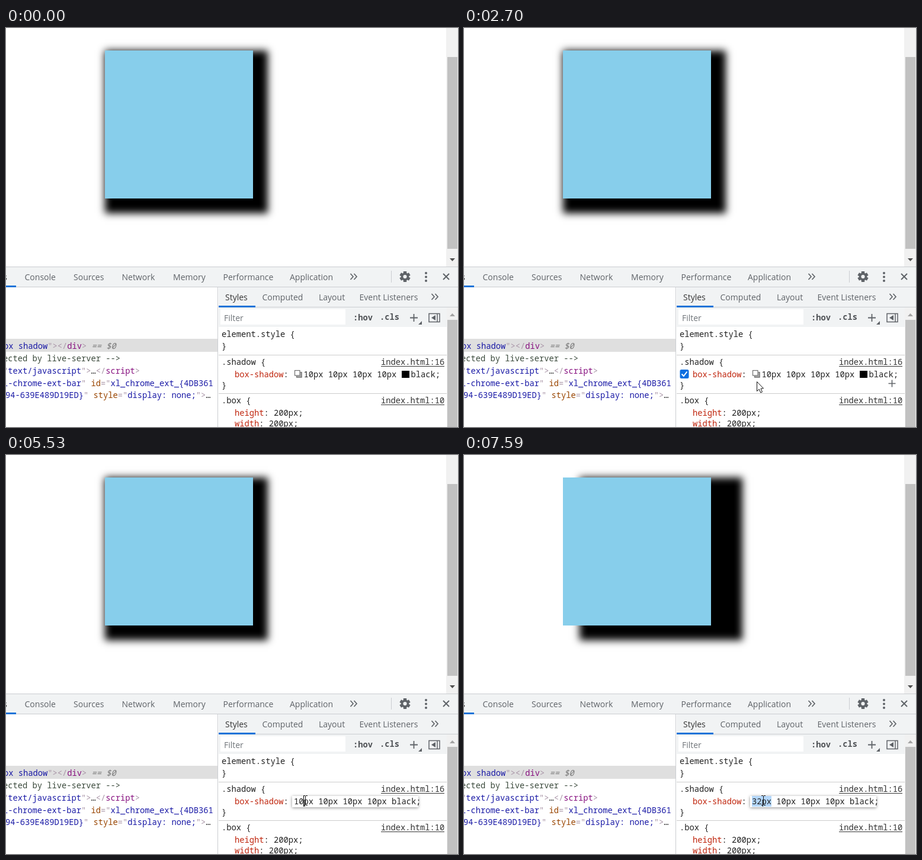
Animation of 763x674 px, one loop 8 s. Source, as an HTML page with a canvas:

```html
<!DOCTYPE html>
<html lang="en">
<head>
<meta charset="utf-8">
<title>Box shadow in the styles pane</title>
<style>
  html, body { margin: 0; width: 100%; height: 100%; overflow: hidden; background: #fff; }
  #box { position: absolute; left: 167px; top: 38px; width: 250px; height: 250px; background: skyblue; }
  canvas { position: absolute; left: 0; top: 0; }
</style>
</head>
<body>
<div id="box"></div>
<canvas id="stage" width="763" height="674"></canvas>
<script>
const box = document.getElementById('box');
const ctx = document.getElementById('stage').getContext('2d');
const LOOP = 8000;
const ZOOM = 1.25;
const UI = '14px "Open Sans", "Noto Sans", sans-serif';
const MONO = '13.75px "Noto Sans Mono", "DejaVu Sans Mono", monospace';
const INK = '#222', GREY = '#5f6368', BAR = '#f1f3f4', LINE = '#cacdd1', BLUE = '#1a73d8';
const TAG = '#881280', PUNCT = '#a894a6', ATTR = '#994500', VALUE = '#1a1aa6', PROP = '#c0260e';

// Pointer waypoints: time, x, y
const PATH = [
  [745, 508, 592], [940, 462, 500], [1200, 362, 300], [1450, 322, 223],
  [1980, 322, 223], [2175, 370, 337], [2435, 446, 520], [2630, 490, 607], [2760, 498, 587],
  [2824, 498, 587], [2825, 648, 606], [3084, 648, 606], [3085, 622, 603], [3280, 523, 583],
  [4254, 523, 583], [4255, 517, 583], [4385, 505, 583]
];
// Click highlights: start, end, x, y
const CLICKS = [[1580, 1710, 322, 223], [3550, 3610, 523, 581], [4400, 4470, 505, 581]];

function rect(x, y, w, h, color) {
  ctx.fillStyle = color;
  ctx.fillRect(x, y, w, h);
}

function text(str, x, y, color, font = UI, align = 'left') {
  ctx.font = font;
  ctx.fillStyle = color;
  ctx.textAlign = align;
  ctx.fillText(str, x, y);
}

// Alternating strings and colours, laid out one after another
function code(x, y, ...parts) {
  for (let i = 0; i < parts.length; i += 2) {
    text(parts[i], x, y, parts[i + 1], MONO);
    x += ctx.measureText(parts[i]).width;
  }
}

function poly(points, color, stroke) {
  ctx.beginPath();
  points.forEach(([x, y]) => ctx.lineTo(x, y));
  ctx.closePath();
  ctx.fillStyle = color;
  ctx.fill();
  if (stroke) {
    ctx.strokeStyle = stroke;
    ctx.lineWidth = 1;
    ctx.stroke();
  }
}

function lines(color, width, ...paths) {
  ctx.strokeStyle = color;
  ctx.lineWidth = width;
  ctx.beginPath();
  for (const [x, y, ...rest] of paths) {
    ctx.moveTo(x, y);
    for (let i = 0; i < rest.length; i += 2) ctx.lineTo(rest[i], rest[i + 1]);
  }
  ctx.stroke();
}

function disc(x, y, r, color) {
  ctx.fillStyle = color;
  ctx.beginPath();
  ctx.arc(x, y, r, 0, Math.PI * 2);
  ctx.fill();
}

function offsetAt(t) {
  if (t < 6080) return 10;
  if (t < 6610) return 11;
  if (t < 7520) return Math.min(33, 12 + 2 * Math.floor((t - 6610) / 64.5));
  return 32;
}

// The page repaints one step after the first press of a key
function paintedOffsetAt(t) {
  if (t >= 6080 && t < 6140) return 10;
  if (t >= 7520 && t < 7590) return 33;
  return offsetAt(t);
}

function pointerAt(t) {
  const step = 1980 + Math.floor((t - 1980) / 65) * 65;
  const next = PATH.findIndex(p => p[0] > step);
  if (next === 0) return PATH[0].slice(1);
  if (next < 0) return PATH[PATH.length - 1].slice(1);
  const [t0, x0, y0] = PATH[next - 1], [t1, x1, y1] = PATH[next];
  const k = (step - t0) / (t1 - t0);
  return [Math.round(x0 + (x1 - x0) * k), Math.round(y0 + (y1 - y0) * k)];
}

function drawPage(offset) {
  const side = 10 * ZOOM + 'px';
  box.style.boxShadow = `${offset * ZOOM}px ${side} ${side} ${side} black`;
  rect(743, 0, 20, 403, '#f1f1f1');
  rect(745, 49, 17, 324, '#c1c1c1');
  poly([[749, 389], [758, 389], [753.5, 394]], '#505050');
}

function chevrons(x, y) {
  lines(GREY, 1.7, [x, y - 5, x + 4.5, y, x, y + 5], [x + 6, y - 5, x + 10.5, y, x + 6, y + 5]);
}

function drawGear(x, y) {
  ctx.save();
  ctx.translate(x, y);
  for (let i = 0; i < 6; i++) {
    rect(-2.7, -9, 5.4, 5, GREY);
    ctx.rotate(Math.PI / 3);
  }
  disc(0, 0, 6.8, GREY);
  disc(0, 0, 3.1, BAR);
  ctx.restore();
}

function drawToolbar() {
  rect(0, 403, 763, 35, BAR);
  rect(0, 403, 763, 1, LINE);
  rect(0, 437, 763, 1, LINE);
  text('s', 2, 426, '#333', UI, 'right');
  rect(0, 435, 17, 3, BLUE);
  [['Console', 31.5], ['Sources', 114], ['Network', 195.5], ['Memory', 282],
   ['Performance', 366.5], ['Application', 479]].forEach(([label, x]) => text(label, x, 426, GREY));
  chevrons(581.5, 420);
  rect(650, 410, 1, 20, LINE);
  drawGear(673.5, 420);
  [414, 420.5, 427].forEach(y => disc(709, y, 2, GREY));
  lines(GREY, 2, [738, 415, 748, 425], [748, 415, 738, 425]);
}

function drawElements() {
  rect(0, 438, 357, 236, '#fff');
  rect(0, 525, 357, 22, '#dfdfdf');
  code(-4, 542, 'ox shadow', VALUE, '"></', PUNCT, 'div', TAG, '>', PUNCT);
  text('== $0', 144.5, 542, '#777', 'italic ' + MONO);
  code(-5, 563, 'ected by live-server -->', '#3b4a3c');
  code(-5, 584, '"', PUNCT, 'text/javascript', VALUE, '">', PUNCT, '…', INK, '</', PUNCT, 'script', TAG, '>', PUNCT);
  code(-5, 605, 'l-chrome-ext-bar', VALUE, '"', PUNCT, ' id', ATTR, '="', PUNCT, 'xl_chrome_ext_{4DB361', VALUE);
  code(-1, 625, '94-639E489D19ED}', VALUE, '"', PUNCT, ' style', ATTR, '="', PUNCT, 'display: none;', VALUE, '">', PUNCT, '…', INK);
  rect(357, 438, 1, 236, LINE);
}

function drawStylesBars() {
  rect(358, 438, 405, 236, '#fff');
  rect(359, 438, 404, 67, BAR);
  rect(359, 471, 404, 1, LINE);
  rect(359, 469, 62, 3, BLUE);
  text('Styles', 370, 460, '#333');
  text('Computed', 432.5, 460, GREY);
  text('Layout', 528, 460, GREY);
  text('Event Listeners', 596.5, 460, GREY);
  chevrons(718.5, 454);
  rect(362, 475, 211, 26, '#fff');
  text('Filter', 368, 495, '#70757a');
  text(':hov', 586, 494, '#505357', 'bold ' + MONO);
  text('.cls', 631, 493, '#505357', 'bold ' + MONO);
  lines(GREY, 1.8, [682, 489.5, 695, 489.5], [688.5, 483, 688.5, 496]);
  poly([[702, 495], [702, 501], [696, 501]], GREY);
  ctx.strokeStyle = GREY;
  ctx.lineWidth = 1.5;
  ctx.strokeRect(714, 482.5, 18, 14);
  poly([[725, 485], [725, 494], [718, 489.5]], GREY);
  lines(GREY, 1.5, [728, 482, 728, 497]);
}

function link(str, y) {
  text(str, 633, y, '#333', MONO);
  rect(633, y + 2, 107, 1, '#333');
}

function drawRules() {
  code(364, 522, 'element.style {', INK);
  code(364, 542, '}', INK);
  rect(359, 552, 385, 1, '#ccc');
  code(364, 569, '.shadow {', INK);
  link('index.html:16', 569);
  code(386, 590, 'box-shadow', PROP, ':', INK);
  code(364, 608, '}', INK);
  rect(359, 617, 385, 1, '#ccc');
  code(364, 634, '.box {', INK);
  link('index.html:10', 634);
  code(386, 655, 'height', PROP, ': 200px;', INK);
  code(386, 673, 'width', PROP, ': 200px;', INK);
  rect(744, 472, 19, 202, '#f1f1f1');
  rect(745, 493, 17, 181, '#c1c1c1');
  poly([[749, 487], [758, 487], [753.5, 482]], '#a3a3a3');
}

function drawValue() {
  ctx.strokeStyle = '#6e6e6e';
  ctx.lineWidth = 1.2;
  rect(490.5, 581.5, 9, 9, '#aaa');
  ctx.strokeRect(490.5, 581.5, 8.5, 8.5);
  rect(487.5, 578.5, 9, 9, '#fff');
  ctx.strokeRect(487.5, 578.5, 8.5, 8.5);
  code(502.5, 590, '10px 10px 10px 10px', INK);
  rect(668, 579, 13, 12, '#000');
  code(683.5, 590, 'black;', INK);
}

function drawEditor(t) {
  ctx.save();
  ctx.shadowColor = 'rgba(0,0,0,.45)';
  ctx.shadowBlur = 5;
  ctx.shadowOffsetY = 1;
  rect(483, 576, 213, 19, '#fff');
  ctx.restore();
  if (t < 4400) rect(486, 576, 206, 18, '#b4d7fb');
  if (t >= 6080) rect(486, 576, 33, 18, '#b4d7fb');
  code(486, 590, offsetAt(t) + 'px 10px 10px 10px black', INK);
  code(692, 590, ';', INK);
  const caretOn = t >= 4400 && t < 5000 || t >= 5530 && t < 6080;
  if (caretOn) rect(502, 576, 1, 18, '#000');
}

function drawHoverTools() {
  ctx.fillStyle = '#0d6fe0';
  ctx.beginPath();
  ctx.roundRect(364.5, 577, 15, 15, 2.5);
  ctx.fill();
  lines('#fff', 2, [367.5, 584.5, 370.8, 588, 376.5, 580.5]);
  lines(GREY, 1.6, [716.5, 600.5, 728.5, 600.5], [722.5, 594.5, 722.5, 606.5]);
}

function drawPointer(x, y) {
  const overText = y >= 575 && y < 595 && x >= 386 && x < 733;
  if (overText) {
    lines('#111', 1,
      [x + .5, y - 7, x + .5, y + 8],
      [x - 3, y - 7.5, x, y - 7.5], [x + 1, y - 7.5, x + 4, y - 7.5],
      [x - 3, y + 8.5, x, y + 8.5], [x + 1, y + 8.5, x + 4, y + 8.5]);
    return;
  }
  const arrow = [[0, 0], [0, 16], [3.7, 12.6], [6.3, 18.5], [9, 17.3], [6.5, 11.6], [11, 11.3]];
  poly(arrow.map(([dx, dy]) => [x + dx + .5, y + dy + .5]), '#fff', '#111');
}

function draw(t) {
  const moving = t >= 730;
  const editing = t >= 3610;
  const [x, y] = pointerAt(t);
  ctx.clearRect(0, 0, 763, 674);
  drawPage(paintedOffsetAt(t));
  drawToolbar();
  drawElements();
  drawStylesBars();
  drawRules();
  if (editing) drawEditor(t);
  else drawValue();
  if (moving && !editing && x > 358 && y > 552 && y < 617) drawHoverTools();
  for (const [start, end, cx, cy] of CLICKS) {
    if (t >= start && t < end) disc(cx, cy, 15, 'rgba(255,255,0,.47)');
  }
  if (moving) drawPointer(x, y);
}

function frame() {
  draw(performance.now() % LOOP);
  requestAnimationFrame(frame);
}
frame();
</script>
</body>
</html>
```
